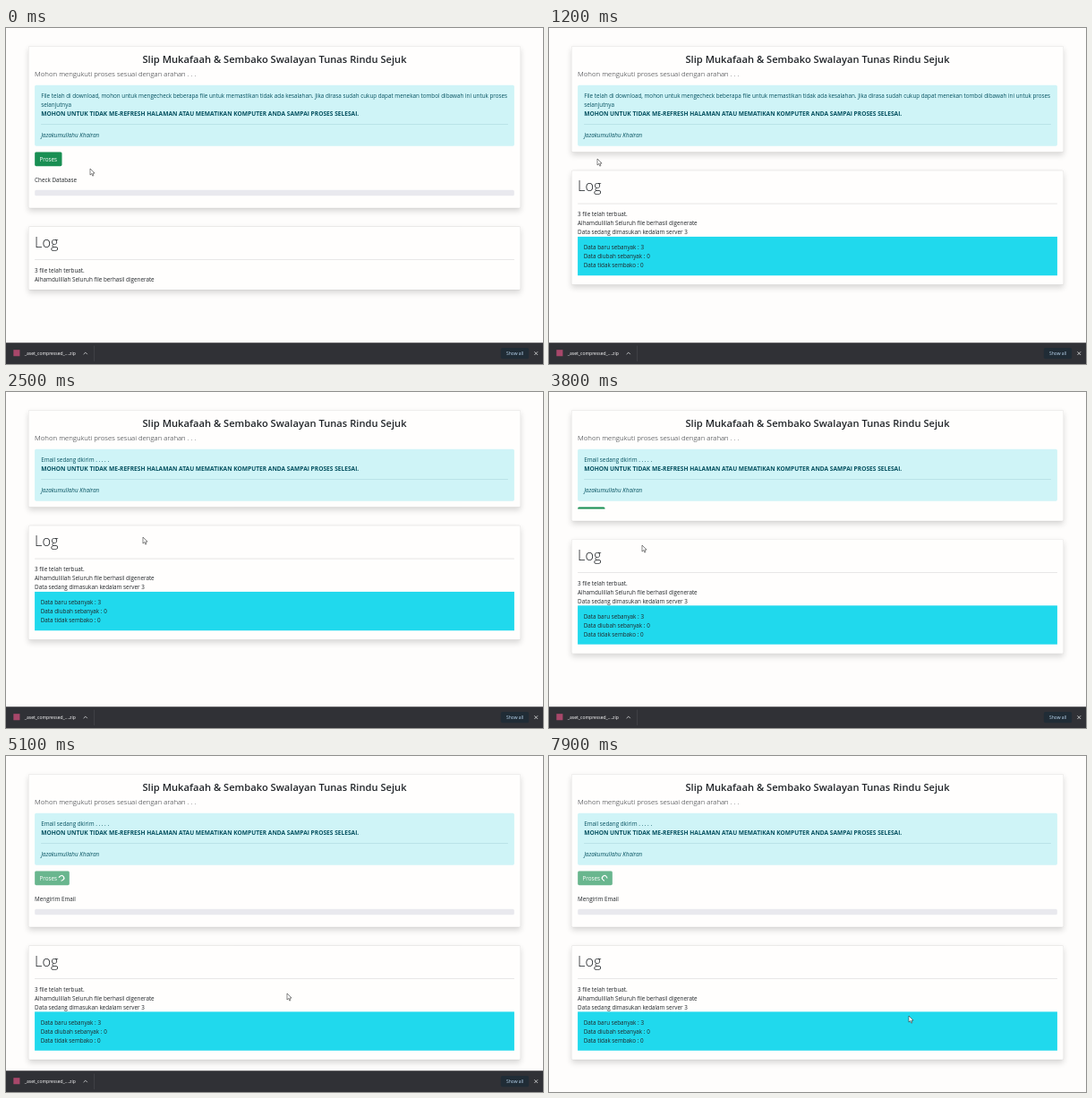
Write an HTML page that moves like this. It is 600 px wide and 375 px high and loops after 8000 ms.

```html
<!DOCTYPE html>
<html lang="id">
<head>
<meta charset="utf-8">
<title>Slip Mukafaah</title>
<style>
  * { box-sizing: border-box; }
  html, body { margin: 0; width: 100%; height: 100%; overflow: hidden; background: #fefdfc; }
  #stage {
    position: relative; width: 1440px; height: 900px; overflow: hidden;
    transform: scale(.4166667); transform-origin: 0 0;
    font: 15.14px/24px "Open Sans", "Noto Sans", sans-serif; color: #212529;
    padding: 48px 60px 0; white-space: nowrap; background: #fefdfc;
  }
  .card {
    padding: 16px; margin-bottom: 48px; background: #fffefd;
    border: 1px solid rgba(0,0,0,.125); border-radius: 4px;
    box-shadow: 0 8px 16px rgba(0,0,0,.15);
  }
  h3 {
    position: relative; top: 1px; margin: 0 0 8px;
    font-size: 26.8px; font-weight: 600; line-height: 33.6px; text-align: center;
  }
  .lead { margin: 0 0 16px; font-size: 18.7px; font-weight: 300; line-height: 30px; }
  h1 { margin: 0 0 24px; font-size: 39px; font-weight: 300; line-height: 48px; }
  hr { margin: 16px 0; height: 1px; border: 0; background: currentColor; opacity: .25; }
  .alert { padding: 17px; background: #cff4f7; color: #055160; border-radius: 4px; }
  .alert b { display: block; font-size: 15.9px; }
  #panel { margin: 16px 0; overflow: hidden; }
  #button {
    display: inline-block; vertical-align: top; height: 38px; padding: 7px 13px;
    border-radius: 4px; background: #198f53; color: #fff;
  }
  #spinner {
    display: inline-block; width: 16px; height: 16px; vertical-align: -2px;
    border: 3.2px solid #fff; border-right-color: transparent; border-radius: 50%;
  }
  #label { margin: 24px 0 16px; }
  .track { height: 16px; border-radius: 4px; background: #e9e9ee; }
  .info { padding: 16px; margin-bottom: 8px; background: #20d9ed; }
  #bar {
    position: absolute; left: 0; top: 843px; width: 1440px; height: 57px;
    background: #303136; color: #fff; font-size: 12px;
  }
  #bar > * { position: absolute; }
  .icon { left: 20px; top: 19px; width: 17px; height: 17px; background: #a8476a; }
  .file { left: 50px; top: 17px; }
  .rule { left: 236px; top: 8px; width: 1px; height: 42px; background: #56575c; }
  .all {
    left: 1327px; top: 14px; width: 75px; height: 29px; line-height: 28px; text-align: center;
    border-radius: 4px; background: #202c36; color: #bfdcf5; font-weight: 500;
  }
  #bar svg { left: 0; top: 0; }
  #cursor { position: absolute; left: 0; top: 0; overflow: visible; }
</style>
</head>
<body>
<div id="stage">
  <div class="card">
    <h3>Slip Mukafaah &amp; Sembako Swalayan Tunas Rindu Sejuk</h3>
    <p class="lead">Mohon mengukuti proses sesuai dengan arahan . . .</p>
    <div class="alert">
      <div id="saved">File telah di download, mohon untuk mengecheck beberapa file untuk memastikan tidak ada kesalahan. Jika dirasa sudah cukup dapat menekan tombol dibawah ini untuk proses<br>selanjutnya</div>
      <div id="mailing">Email sedang dkirim . . . . .</div>
      <b>MOHON UNTUK TIDAK ME-REFRESH HALAMAN ATAU MEMATIKAN KOMPUTER ANDA SAMPAI PROSES SELESAI.</b>
      <hr>
      <i>Jazakumullahu Khairan</i>
    </div>
    <div id="panel">
      <div id="button">Proses<span id="wait"> <span id="spinner"></span></span></div>
      <div id="label"></div>
      <div class="track"></div>
    </div>
  </div>

  <div class="card">
    <h1>Log</h1>
    <hr>
    3 file telah terbuat.<br>
    Alhamdulillah Seluruh file berhasil digenerate
    <div id="result">
      Data sedang dimasukan kedalam server 3
      <div class="info">Data baru sebanyak : 3<br>Data diubah sebanyak : 0<br>Data tidak sembako : 0</div>
    </div>
  </div>

  <div id="bar">
    <span class="icon"></span>
    <span class="file">_aset_compressed_....zip</span>
    <span class="rule"></span>
    <span class="all">Show all</span>
    <svg width="1440" height="57" fill="none" stroke="#d5d6d9" stroke-width="2">
      <path d="M208 31l5-5 5 5M1417 24l9 9m0-9l-9 9"/>
    </svg>
  </div>

  <svg id="cursor" width="14" height="21">
    <path d="M0 0V17L4 13.3 6.7 19.5 9.4 18.3 6.8 12.2H12.2Z" fill="#fff" stroke="#222" stroke-width="1.3"/>
  </svg>
</div>

<script>
const LOOP = 8000, PANEL_HEIGHT = 118, SLIDE = 350;
const $ = id => document.getElementById(id);
const clamp = x => Math.min(1, Math.max(0, x));
const show = (id, on) => $(id).style.display = on ? '' : 'none';

// Event times in ms
const firstClick = 470, hide = 580, logged = 1050, mailed = 2200,
      reveal = 3780, secondClick = 4350, barClosed = 5740;

// Pointer path: time, x, y
const path = [
  [0, 94, 157], [430, 48, 147], [900, 49, 147], [1200, 54, 146], [1900, 128, 160],
  [2500, 153, 162], [3300, 140, 168], [3800, 104, 171], [4250, 48, 136], [4500, 48, 136],
  [5100, 314, 265], [5400, 574, 360], [5550, 590, 361], [5800, 590, 361],
  [6400, 406, 295], [7000, 402, 290], [LOOP, 402, 290]
];

// cubic-bezier(.25, .1, .25, 1)
function ease(x) {
  let lo = 0, hi = 1, s;
  for (let i = 0; i < 20; i++) {
    s = (lo + hi) / 2;
    const at = .75 * s * (1 - s) + s ** 3;
    if (at < x) lo = s; else hi = s;
  }
  return .3 * s * (1 - s) ** 2 + 3 * s * s * (1 - s) + s ** 3;
}

function pointer(t) {
  const i = path.findIndex(p => p[0] > t);
  const [t0, x0, y0] = path[i - 1], [t1, x1, y1] = path[i];
  const u = (t - t0) / (t1 - t0), k = u * u * (3 - 2 * u);
  return [x0 + (x1 - x0) * k, y0 + (y1 - y0) * k];
}

function draw(now) {
  const t = now % LOOP;
  const second = t >= reveal;
  const slide = ease(clamp((t - (second ? reveal : hide)) / SLIDE));
  const busy = second ? t >= secondClick : t >= firstClick;

  show('panel', second || t < hide + SLIDE);
  $('panel').style.height = PANEL_HEIGHT * (second ? slide : 1 - slide) + 'px';
  $('label').textContent = second ? 'Mengirim Email' : 'Check Database';
  $('button').style.opacity = busy ? .65 : 1;
  show('wait', busy);
  $('spinner').style.transform = `rotate(${48 + (t - 6400) * 360 / 750}deg)`;

  show('saved', t < mailed);
  show('mailing', t >= mailed);
  show('result', t >= logged);

  $('bar').style.transform = `translateY(${57 * clamp((t - barClosed) / 120)}px)`;
  const [x, y] = pointer(t);
  $('cursor').style.transform = `translate(${x * 2.4}px, ${y * 2.4}px)`;
}

const start = performance.now();
function tick() {
  draw(performance.now() - start);
  requestAnimationFrame(tick);
}
tick();
</script>
</body>
</html>
```
